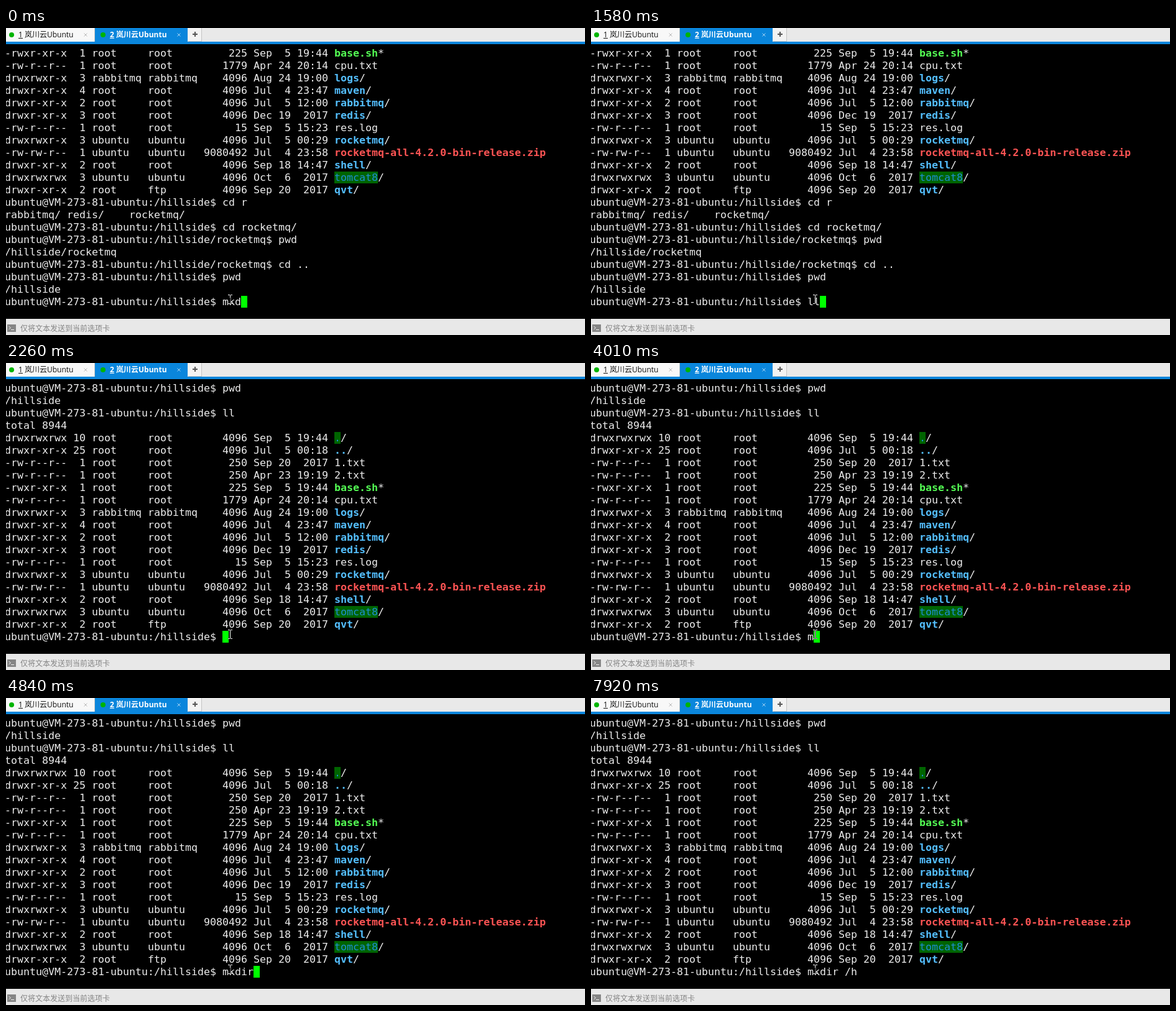
Write an HTML page with a canvas that moves like this. It is 931 px wide and 494 px high and loops after 8000 ms.

```html
<!DOCTYPE html>
<html lang="zh">
<head>
<meta charset="utf-8">
<title>Terminal</title>
<style>
html, body { margin: 0; width: 100%; height: 100%; overflow: hidden; background: #000; }
canvas { display: block; }
</style>
</head>
<body>
<canvas id="stage" width="931" height="494"></canvas>
<script>
const ctx = document.getElementById('stage').getContext('2d');
const LOOP = 8000;
const CELL = 10, LINE = 20, LEFT = -2, TOP = 31, NAME_COL = 53;
const MONO = '16.61px "DejaVu Sans Mono", monospace';
const UI = '12px "Open Sans", "Noto Sans CJK SC", "Noto Sans CJK", sans-serif';

const FG = '#ececec', GREEN = '#54ff54', BLUE = '#54bfff', RED = '#ff5454';
const CURSOR = '#00ff00', SHARED_BG = '#006400', SHARED_FG = '#1e8fd5';
const BRAND = '#0a86dc';

const HOME = '/hillside';
const prompt = (cmd = '', dir = HOME) => `ubuntu@VM-273-81-ubuntu:${dir}$ ${cmd}`;

const listing = [
  'drwxrwxrwx 10 root     root        4096 Sep  5 19:44 ./',
  'drwxr-xr-x 25 root     root        4096 Jul  5 00:18 ../',
  '-rw-r--r--  1 root     root         250 Sep 20  2017 1.txt',
  '-rw-r--r--  1 root     root         250 Apr 23 19:19 2.txt',
  '-rwxr-xr-x  1 root     root         225 Sep  5 19:44 base.sh*',
  '-rw-r--r--  1 root     root        1779 Apr 24 20:14 cpu.txt',
  'drwxrwxr-x  3 rabbitmq rabbitmq    4096 Aug 24 19:00 logs/',
  'drwxr-xr-x  4 root     root        4096 Jul  4 23:47 maven/',
  'drwxr-xr-x  2 root     root        4096 Jul  5 12:00 rabbitmq/',
  'drwxr-xr-x  3 root     root        4096 Dec 19  2017 redis/',
  '-rw-r--r--  1 root     root          15 Sep  5 15:23 res.log',
  'drwxrwxr-x  3 ubuntu   ubuntu      4096 Jul  5 00:29 rocketmq/',
  '-rw-rw-r--  1 ubuntu   ubuntu   9080492 Jul  4 23:58 rocketmq-all-4.2.0-bin-release.zip',
  'drwxr-xr-x  2 root     root        4096 Sep 18 14:47 shell/',
  'drwxrwxrwx  3 ubuntu   ubuntu      4096 Oct  6  2017 tomcat8/',
  'drwxr-xr-x  2 root     ftp         4096 Sep 20  2017 qvt/'
];

const history = [
  prompt('cd r'),
  'rabbitmq/ redis/    rocketmq/',
  prompt('cd rocketmq/'),
  prompt('pwd', HOME + '/rocketmq'),
  HOME + '/rocketmq',
  prompt('cd ..', HOME + '/rocketmq'),
  prompt('pwd'),
  HOME
];

const before = [...listing.slice(4), ...history];
const during = [...listing.slice(6), ...history, prompt('ll'), 'total 89441'];
const after = [prompt('pwd'), HOME, prompt('ll'), 'total 8944', ...listing];

// start time, finished lines, line being written, cursor shown
const steps = [
  [0, before, prompt('mkd'), true],
  [560, before, prompt('mk'), true],
  [710, before, prompt('m'), true],
  [990, before, prompt(), true],
  [1430, before, prompt('l'), true],
  [1580, before, prompt('ll'), true],
  [2110, during, 'total 8944', true],
  [2260, after, prompt(), true],
  [4010, after, prompt('m'), true],
  [4160, after, prompt('mk'), true],
  [4470, after, prompt('mkd'), true],
  [4720, after, prompt('mkdi'), true],
  [4840, after, prompt('mkdir'), true],
  [7210, after, prompt('mkdir '), true],
  [7610, after, prompt('mkdir /'), true],
  [7920, after, prompt('mkdir /h'), false]
];

function rect(x, y, w, h, color) {
  ctx.fillStyle = color;
  ctx.fillRect(x, y, w, h);
}

function label(str, x, y, color, weight = '') {
  ctx.font = `${weight} ${UI}`;
  ctx.fillStyle = color;
  ctx.fillText(str, x, y);
}

function stroke(points, color, width = 1) {
  ctx.strokeStyle = color;
  ctx.lineWidth = width;
  ctx.beginPath();
  points.forEach(([x, y], i) => i ? ctx.lineTo(x, y) : ctx.moveTo(x, y));
  ctx.stroke();
}

function cells(str, col, row, color = FG, bold = false, bg = null) {
  const y = TOP + row * LINE;
  if (bg) rect(LEFT + col * CELL, y, str.length * CELL, 19, bg);
  ctx.font = (bold ? 'bold ' : '') + MONO;
  ctx.fillStyle = color;
  [...str].forEach((ch, i) => {
    if (ch !== ' ') ctx.fillText(ch, LEFT + (col + i) * CELL, y + 15);
  });
}

function drawLine(line, row) {
  if (!/^[d-][rwx-]{9} /.test(line)) return cells(line, 0, row);
  const [, name, mark] = line.slice(NAME_COL).match(/^(.*?)([\/*]?)$/);
  cells(line.slice(0, NAME_COL), 0, row);
  if (line.startsWith('drwxrwxrwx')) cells(name, NAME_COL, row, SHARED_FG, false, SHARED_BG);
  else if (mark === '/') cells(name, NAME_COL, row, BLUE, true);
  else if (mark === '*') cells(name, NAME_COL, row, GREEN, true);
  else if (name.endsWith('.zip')) cells(name, NAME_COL, row, RED, true);
  else cells(name, NAME_COL, row);
  cells(mark, NAME_COL + name.length, row);
}

function drawTab(x, w, num, active) {
  const ink = active ? '#fff' : '#111';
  const weight = active ? 'bold' : '';
  rect(x, 0, w, 22, active ? BRAND : '#f8f8f8');
  ctx.fillStyle = '#00b400';
  ctx.beginPath();
  ctx.arc(x + (active ? 13 : 9), 11, 4, 0, Math.PI * 2);
  ctx.fill();
  const tx = x + (active ? 24 : 20);
  label(num, tx, 15, ink, weight);
  rect(tx, 16, 7, 1, ink);
  label('岚川云Ubuntu', tx + 10, 15, ink, weight);
  const cx = x + w - (active ? 14 : 14), c = active ? '#a5d3f3' : '#b8b8b8';
  stroke([[cx - 2.5, 8.5], [cx + 2.5, 13.5]], c);
  stroke([[cx + 2.5, 8.5], [cx - 2.5, 13.5]], c);
}

function drawChrome() {
  rect(0, 0, 931, 22, '#e9e9e9');
  drawTab(0, 142, '1', false);
  drawTab(143, 149, '2', true);
  rect(142, 0, 1, 22, '#c8c8c8');
  rect(293, 0, 21, 21, '#f3f3f3');
  rect(314, 0, 1, 22, '#c4c4c4');
  rect(293, 21, 22, 1, '#c4c4c4');
  rect(300, 9, 8, 2, '#555');
  rect(303, 6, 2, 8, '#555');
  rect(0, 22, 931, 4, BRAND);

  rect(0, 468, 931, 26, '#e8e8e8');
  rect(2, 477, 14, 12, '#858585');
  stroke([[4.5, 480], [7.5, 482.5], [4.5, 485]], '#eee');
  rect(8, 485, 5, 1, '#eee');
  label('仅将文本发送到当前选项卡', 23, 488, '#858585');
}

// The pointer inverts whatever lies beneath it.
function drawPointer() {
  ctx.globalCompositeOperation = 'difference';
  rect(360, 430, 1, 13, '#fff');
  for (const y of [429, 443]) {
    rect(357, y, 3, 1, '#fff');
    rect(361, y, 3, 1, '#fff');
  }
  ctx.globalCompositeOperation = 'source-over';
}

function draw([, lines, current, cursor]) {
  rect(0, 0, 931, 494, '#000');
  lines.forEach(drawLine);
  cells(current, 0, lines.length);
  if (cursor) rect(LEFT + current.length * CELL, TOP + lines.length * LINE, CELL, 19, CURSOR);
  drawPointer();
  drawChrome();
}

const start = performance.now();
let shown = null;

function tick() {
  const t = (performance.now() - start) % LOOP;
  const step = steps.filter(s => s[0] <= t).pop();
  if (step !== shown) draw(shown = step);
  requestAnimationFrame(tick);
}
tick();
</script>
</body>
</html>
```
